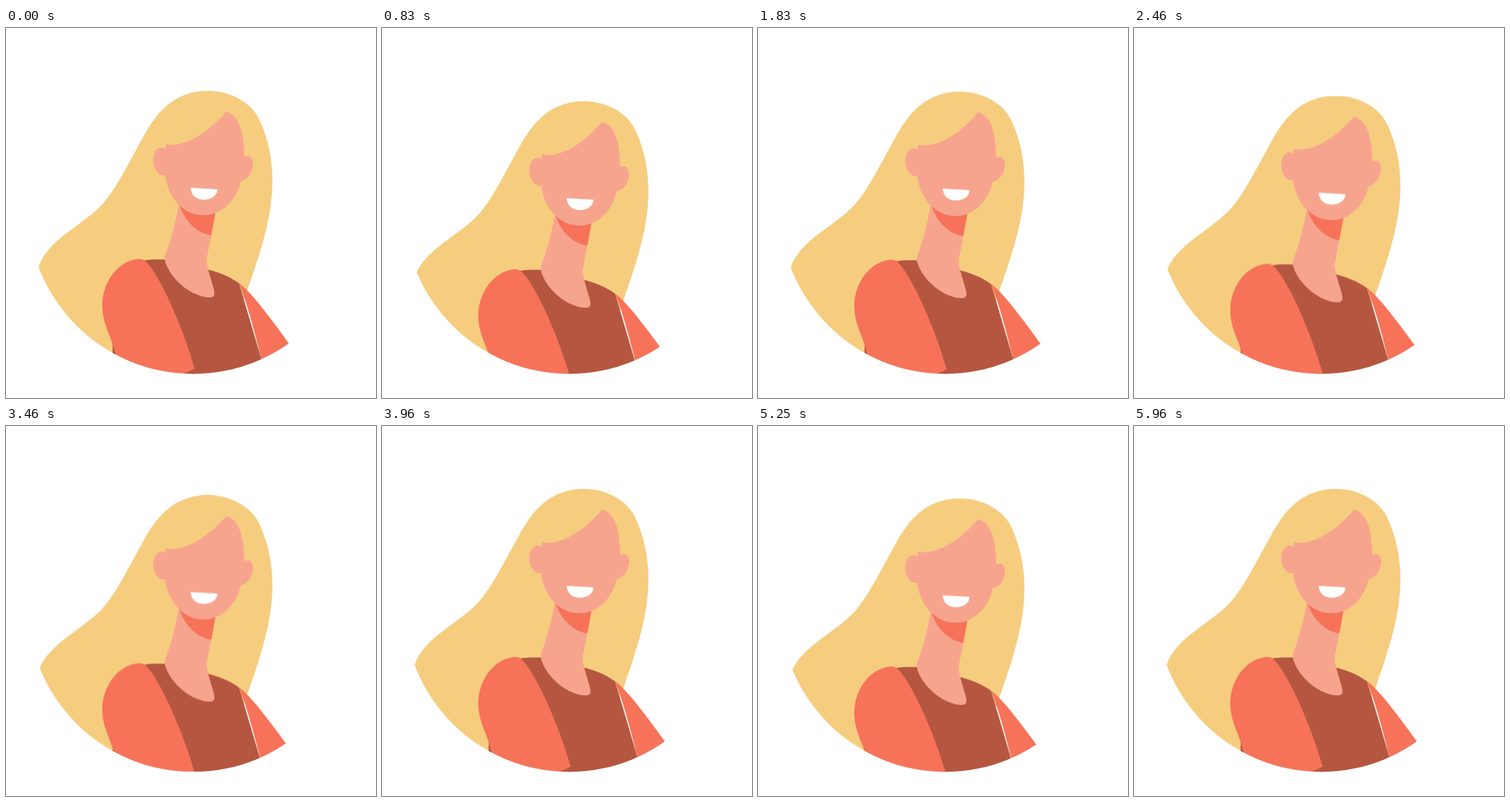
Recreate the animation shown at these times as an HTML page without scripts. Size 500 by 500 pixels, loop 6000 ms.

```html
<!DOCTYPE html>
<html lang="en">
<head>
<meta charset="utf-8">
<title>Bobbing portrait</title>
<style>
  html, body { margin: 0; width: 100%; height: 100%; overflow: hidden; background: #fff; }
  svg { display: block; width: 100%; height: 100%; }
  .hair { fill: #f6cd7f; }
  .skin { fill: #f7a48f; }
  .coral { fill: #f67359; }
  .top { fill: #b55740; }
  .teeth { fill: #fff; }
  /* sine-like ease, one full bob every two seconds */
  .bob { animation: bob 1s cubic-bezier(.37, 0, .63, 1) infinite alternate; }
  @keyframes bob { to { transform: translateY(15px); } }
</style>
</head>
<body>
<svg viewBox="0 0 500 500">
  <clipPath id="disc"><circle cx="253" cy="244" r="223.4"/></clipPath>
  <g clip-path="url(#disc)">
    <g class="bob">
      <path class="hair" d="M20 400 L41 333 L44 323 C56 285 108 265 133 235 C150 215 167 180 185 148
        C203 115 226 85 273 85 C305 85 333 102 343 125 C355 152 360 178 360 207
        C360 255 345 300 326 355 L300 420 L150 520 H20Z"/>
      <path class="top" d="M144 425 L187 314 C195 312.500 206 312.500 215 313 L271 326
        C285 329 303 336 315 345 L345 447 L365 520 H144Z"/>
      <path class="coral" d="M315 345 C330 355 360 395 382 426 L396 446 L365 520 L345 447
        C337 415 326 372 315 345Z"/>
      <path class="coral" d="M180 312 C150 314 130 345 130 375 C130 395 139 412 143 424 L149 444 L160 490
        L225 475 L242 466.500 L255 460 C238 400 205 328 187 314 Q184 312 180 312Z"/>
      <path class="skin" d="M234 236 C230 258 224 285 215 307 Q213.500 311 215 315
        C222 340 252 364 275 364 C284 364 282 357 280 350 C276 335 271 322 271 313 L284 245Z"/>
      <path class="coral" d="M233.500 236 C240 260 258 278 277.500 280 L283.500 246Z"/>
      <path class="skin" d="M216 157 C240 162 272 143 297.500 113 C313 117 322 137 322 175
        C326 171 333 173 334 182 C334 194 327 205 317 207 C311 235 290 253 267 253
        C240 253 219 230 215 199 C205 200 199 190 199 178 C199 165 207 158 216 163Z"/>
      <path class="teeth" d="M249.500 216 L286 218 C285 228 276 232 267 232 C256 232 250 225 249.500 216Z"/>
    </g>
  </g>
</svg>
</body>
</html>
```
